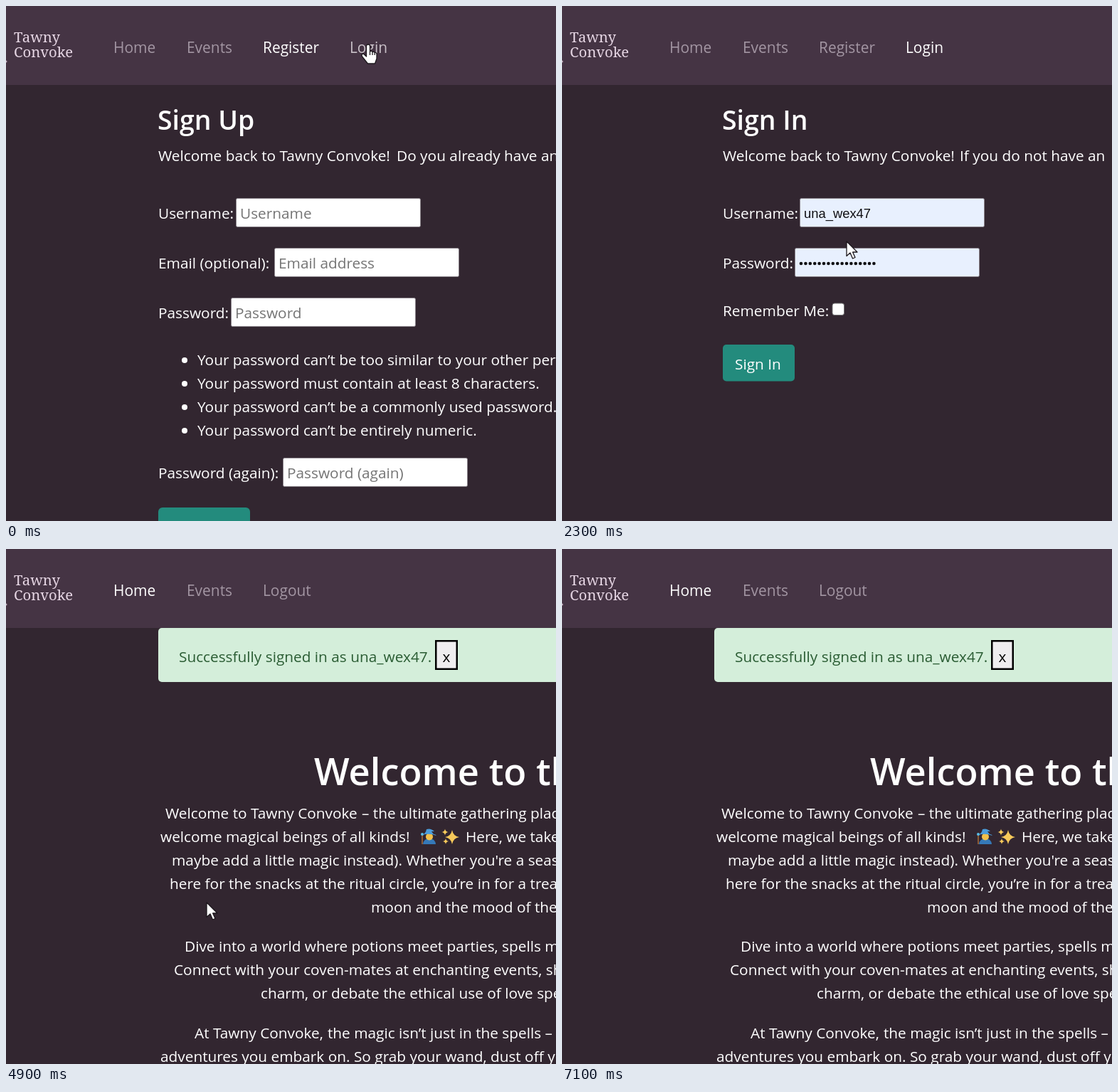
An HTML page with a canvas for the animation above (7200 ms loop, 773 by 724 pixels).

```html
<!DOCTYPE html>
<html lang="en">
<head>
<meta charset="utf-8">
<title>Sign in flow</title>
<style>
  html, body { margin: 0; width: 100%; height: 100%; overflow: hidden; background: #322630; }
  canvas { display: block; }
</style>
</head>
<body>
<canvas id="stage" width="773" height="724"></canvas>
<script>
const ctx = document.getElementById('stage').getContext('2d');
const LOOP = 7200, STEP = 100;
const BRAND = ['Tawny', 'Convoke'];
const BRAND_NAME = BRAND.join(' ');
const USER = 'una_wex47';
const SANS = '"Open Sans", "Noto Sans", sans-serif';
const BODY = `20.8px ${SANS}`;
const NAV = `20.9px ${SANS}`;
const HEADING = `600 37.4px ${SANS}`;
const TEAL = '#238b7d', DIM = '#a396a3', FILLED = '#e8f0fe';

// Moments at which the picture changes state
const AT = { signIn: 700, preview: 2200, filled: 2500, hover: 3000, pressed: 3900, home: 4700 };

// Pointer tip: time, x, y
const POINTER = [
  [0, 509, 54], [600, 509, 54], [1500, 508, 66], [1600, 508, 68], [1900, 435, 285],
  [2200, 400, 331], [2500, 400, 331], [3100, 282, 497], [5200, 282, 497],
  [5600, 291, 479], [5800, 340, 450], [6300, 790, 330]
];

const HAND = new Path2D('M-2.5 2.5 A2.5 2.5 0 0 1 2.5 2.5 V10 Q4.5 8.5 6 10.6 Q8.2 9.6 9.2 11.5 Q12 11 12 14 V20 L9.5 27 H-.5 L-8.5 17 Q-10 13.2 -6.5 13.2 L-2.5 17 Z');
const KNUCKLES = new Path2D('M2.5 10 V15 M6 10.6 V15 M9.2 11.5 V15');
const ARROW = new Path2D('M0 0 V20.5 L5 16 L8.5 24 L12 22.5 L8.6 15 H15 Z');

function text(str, x, y, color = '#fff', font = BODY) {
  ctx.font = font;
  ctx.fillStyle = color;
  ctx.fillText(str, x, y);
}

function box(x, y, w, h, r, fill, stroke) {
  ctx.beginPath();
  ctx.roundRect(x, y, w, h, r);
  ctx.fillStyle = fill;
  ctx.fill();
  if (stroke) {
    ctx.strokeStyle = stroke;
    ctx.lineWidth = 1;
    ctx.stroke();
  }
}

function dot(x, y, r, color) {
  ctx.beginPath();
  ctx.arc(x, y, r, 0, 2 * Math.PI);
  ctx.fillStyle = color;
  ctx.fill();
}

function field(label, labelX, x, y, placeholder, fill = '#fff') {
  text(label, labelX, y + 29);
  box(x + .5, y + .5, 259, 40, 2, fill, '#8a838a');
  if (placeholder) text(placeholder, x + 6, y + 29, '#757575');
}

function bullets(x, pitch, r) {
  for (let i = 0; i < 17; i++) dot(x + i * pitch, 362, r, '#101014');
}

function navbar(links, active, hovered) {
  ctx.fillStyle = '#453444';
  ctx.fillRect(0, 0, 773, 111);
  dot(0, 78, 1.5, '#c9b3c5');
  BRAND.forEach((word, i) => text(word, 11, 50.5 + i * 21.5, '#e6d6e4', '20.3px "Noto Serif", serif'));
  const xs = [151, 254, 361, 483];
  links.forEach((name, i) => {
    const color = name === active ? '#fff' : name === hovered ? '#c9c1c8' : DIM;
    text(name, xs[i], 65.5, color, NAV);
  });
}

function signUpPage() {
  navbar(['Home', 'Events', 'Register', 'Login'], 'Register', 'Login');
  text('Sign Up', 213, 174, '#fff', HEADING);
  text(`Welcome back to ${BRAND_NAME}!`, 214, 218);
  text('Do you already have an account?', 549, 218);
  field('Username:', 214, 323, 270, 'Username');
  field('Email (optional):', 214, 377, 340, 'Email address');
  field('Password:', 214, 316, 410, 'Password');
  ['Your password can’t be too similar to your other personal',
   'Your password must contain at least 8 characters.',
   'Your password can’t be a commonly used password.',
   'Your password can’t be entirely numeric.'].forEach((line, i) => {
    dot(251, 498 + i * 33, 4, '#fff');
    text(line, 269, 505 + i * 33);
  });
  field('Password (again):', 214, 389, 635, 'Password (again)');
  box(214, 705, 129, 52, 6, TEAL);
}

function signInPage(t) {
  const preview = t >= AT.preview, filled = t >= AT.filled, hover = t >= AT.hover;
  const fill = preview ? FILLED : '#fff';
  navbar(['Home', 'Events', 'Register', 'Login'], 'Login');
  text('Sign In', 225, 174, '#fff', HEADING);
  text(`Welcome back to ${BRAND_NAME}!`, 226, 218);
  text('If you do not have an', 559, 218);
  field('Username:', 226, 334, 270, preview ? '' : 'Username', fill);
  field('Password:', 226, 327, 340, preview ? '' : 'Password', fill);
  if (filled) {
    text(USER, 340, 299, '#101014');
    bullets(337, 9, 2.8);
  } else if (preview) {
    text(USER, 340, 298, '#101014', '18.4px "Liberation Sans", Arial, sans-serif');
    bullets(336, 6.4, 2.3);
  }
  text('Remember Me:', 226, 436);
  box(380, 418, 16.5, 16.5, 3, '#fff', '#767676');
  if (t >= AT.pressed) box(222, 472, 109, 59, 8, '#233a66');
  box(226, 476, 101, 51.5, 5, hover ? '#fff' : TEAL);
  text('Sign In', 243, 511, hover ? '#4fb6a7' : '#fff');
}

function mage(x, y) {
  const shape = (color, d) => {
    ctx.fillStyle = color;
    ctx.fill(new Path2D(d));
  };
  ctx.save();
  ctx.translate(x, y);
  shape('#3579b8', 'M3 22 Q4 14 12 14 Q20 14 21 22 Z');
  dot(12, 11.5, 5, '#f2c14b');
  shape('#4b9ddb', 'M2 9 Q7 7 8 1 Q14 -1 19 4 L15 4 L18 8 Q21 8 22 10 Q12 6 2 9 Z');
  shape('#8a5a35', 'M1 9 H3 V22 H1 Z');
  dot(2, 8, 2, '#59bde8');
  ctx.restore();
}

function sparkle(x, y, r) {
  ctx.beginPath();
  ctx.moveTo(x, y - r);
  for (let i = 1; i <= 4; i++) {
    const end = i * Math.PI / 2, mid = end - Math.PI / 4;
    ctx.quadraticCurveTo(x + Math.sin(mid) * r * .2, y - Math.cos(mid) * r * .2,
      x + Math.sin(end) * r, y - Math.cos(end) * r);
  }
  ctx.fillStyle = '#f6c95a';
  ctx.fill();
}

function homePage() {
  navbar(['Home', 'Events', 'Logout'], 'Home');
  box(214, 111, 640, 76, 5, '#d4eeda');
  text(`Successfully signed in as ${USER}.`, 243, 159, '#2a5c33');
  ctx.fillStyle = '#000';
  ctx.fillRect(603, 128, 32, 42);
  ctx.fillStyle = '#efedef';
  ctx.fillRect(605.5, 130.5, 27, 37);
  text('x', 613.5, 159, '#000');

  text('Welcome to the', 433, 332, '#fff', `600 52.5px ${SANS}`);
  [[224, 379, `Welcome to ${BRAND_NAME}`],
   [500, 379, '– the ultimate gathering place'],
   [217, 412, 'welcome magical beings of all kinds!'],
   [646, 412, 'Here, we take the'],
   [233, 445, 'maybe add a little magic instead). Whether you\'re a seasoned'],
   [230, 478, 'here for the snacks at the ritual circle, you’re in for a treat'],
   [513, 511, 'moon and the mood of the cauldron'],
   [251, 566, 'Dive into a world where potions meet parties, spells meet'],
   [236, 599, 'Connect with your coven-mates at enchanting events, share'],
   [358, 632, 'charm, or debate the ethical use of love spells'],
   [265, 688, `At ${BRAND_NAME},`],
   [452, 688, 'the magic isn’t just in the spells – it'],
   [217, 721, 'adventures you embark on. So grab your wand, dust off your']
  ].forEach(([x, y, line]) => text(line, x, y));
  mage(583, 393);
  sparkle(627, 405, 10);
  sparkle(617, 398, 4.5);
  sparkle(618, 411, 4);
}

function pointerAt(t) {
  const i = POINTER.findIndex(key => key[0] > t);
  if (i < 0) return null;
  const [t0, x0, y0] = POINTER[i - 1], [t1, x1, y1] = POINTER[i];
  const u = (t - t0) / (t1 - t0), k = u * u * (3 - 2 * u);
  return [x0 + (x1 - x0) * k, y0 + (y1 - y0) * k];
}

function pointer(t) {
  const pos = pointerAt(t);
  if (!pos) return;
  const isHand = t < 1700 || (t >= AT.hover && t < AT.home);
  const shape = isHand ? HAND : ARROW;
  ctx.save();
  ctx.translate(...pos);
  ctx.lineWidth = 1.3;
  ctx.lineJoin = 'round';
  ctx.strokeStyle = '#1c171c';
  ctx.fillStyle = '#fff';
  ctx.fill(shape);
  ctx.stroke(shape);
  if (isHand) ctx.stroke(KNUCKLES);
  ctx.restore();
}

function draw(now) {
  const t = Math.floor(now % LOOP / STEP) * STEP;
  ctx.fillStyle = '#322630';
  ctx.fillRect(0, 0, 773, 724);
  if (t < AT.signIn) signUpPage();
  else if (t < AT.home) signInPage(t);
  else homePage();
  pointer(t);
}

const start = performance.now();
function tick() {
  draw(performance.now() - start);
  requestAnimationFrame(tick);
}
tick();
</script>
</body>
</html>
```
